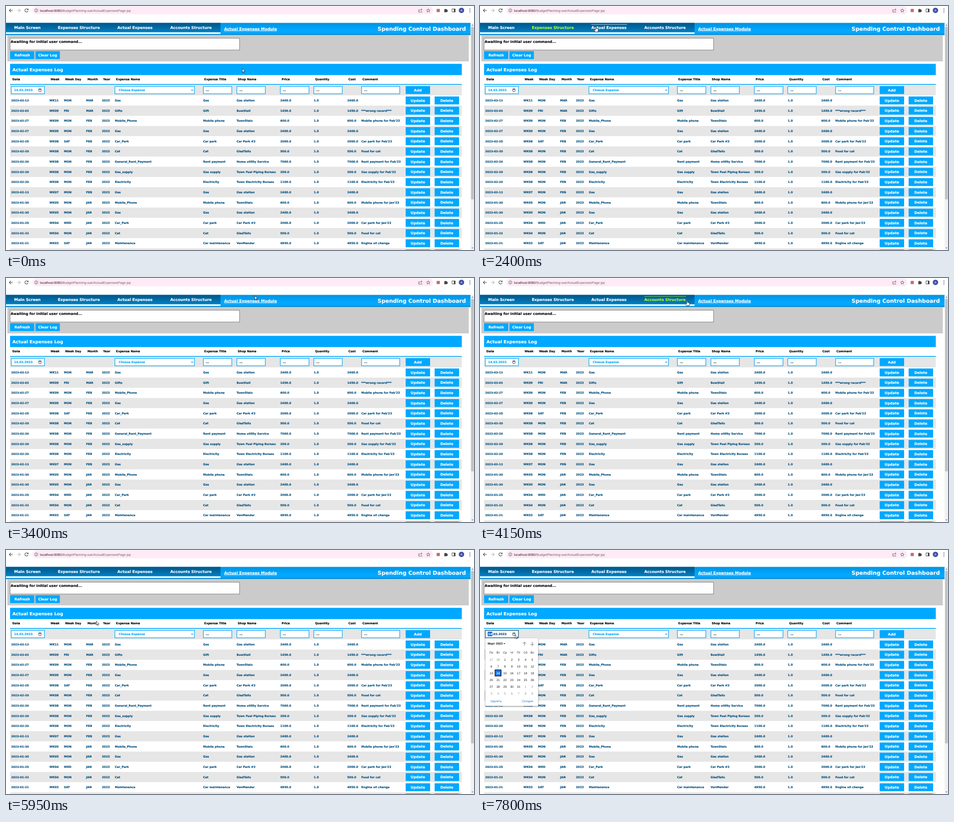
Write an HTML page that moves like this. It is 1034x542 px and loops after 8000 ms.

```html
<!DOCTYPE html>
<html lang="en">
<head>
<meta charset="utf-8">
<title>Actual Expenses</title>
<style>
  html, body { margin: 0; width: 100%; height: 100%; overflow: hidden; background: #fff; }
  svg { display: block; }
  text { fill: currentColor; text-rendering: geometricPrecision; white-space: pre; }
  .heavy { font-family: "DejaVu Sans", sans-serif; font-weight: bold; stroke: currentColor; stroke-width: .18px; }
  .plain { font-family: "Liberation Sans", Arial, sans-serif; }
  .bold { font-weight: bold; }
  .mid { text-anchor: middle; }
  .end { text-anchor: end; }
  .icon { fill: none; stroke: #444; stroke-width: 1.1; }
</style>
</head>
<body>
<svg id="stage" width="1034" height="542" viewBox="0 0 1034 542"></svg>
<script>
const BLUE = '#00a8ff', NAVY = '#004f7f';
const LOOP = 8000, STEP = 50;

const rect = (x, y, w, h, fill, more = '') =>
  `<rect x="${x}" y="${y}" width="${w}" height="${h}" fill="${fill}" ${more}/>`;
const text = (x, y, size, color, str, cls = 'heavy', more = '') =>
  `<text x="${x}" y="${y}" font-size="${size}" class="${cls}" style="color:${color}" ${more}>${str}</text>`;
const icon = (d, more = '') => `<path class="icon" d="${d}" ${more}/>`;
const button = (x, y, w, label) =>
  rect(x, y, w, 17.6, BLUE) + text(x + w / 2, y + 11.8, 7.85, '#fff', label, 'heavy mid');
const field = (x, w, more = '') =>
  rect(x + .6, 178.6, w - 1.2, 16.4, '#fff', `stroke="${BLUE}" stroke-width="1.3" ${more}`);

function browserBar() {
  const dots = [6.5, 10, 13.5].map(y => `<circle cx="1025" cy="${y}" r=".9" fill="#444"/>`).join('');
  return rect(58, 1, 886, 17.5, '#ffeaf7', 'rx="8.7"')
    + icon('M15 10H7.5M11 6.3L7.3 10L11 13.7')
    + icon('M24 10H31.500M28 6.3L31.700 10L28 13.700', 'style="stroke:#b5b5b5"')
    + icon('M48.300 7.800A3.600 3.600 0 1 0 48.800 11M49 5.800V8.500H46.300')
    + '<circle cx="67" cy="9.800" r="3.500" class="icon" style="stroke-width:.8"/>' + icon('M67 9.300V11.800M67 7.600V8.400', 'style="stroke-width:.9"')
    + text(75, 12.6, 7.43, '#222', 'localhost:8080<tspan fill="#666">/BudgetPlanning-war/ActualExpensesPage.jsp</tspan>', 'plain')
    + icon('M913.500 8H911.800V13.500H918.500V11.500M914 11C914 8.500 916 7.800 919 7.800M917 5.600L919.300 7.800L917 10', 'style="stroke-width:.8"')
    + icon('M933 6L934.200 8.600L937 8.900L934.900 10.700L935.500 13.500L933 12L930.500 13.500L931.100 10.700L929 8.900L931.800 8.600Z', 'style="stroke-width:.8"')
    + rect(951.5, 6.5, 7, 7, '#d0646a')
    + '<path d="M968 7.500H970A1.300 1.300 0 1 1 972.600 7.500H974.800V9.500A1.300 1.300 0 1 1 974.800 12V13.800H968V12A1.300 1.300 0 0 0 968 9.500Z" fill="#444"/>'
    + rect(985.5, 6.5, 7, 6.8, 'none', 'stroke="#444"') + rect(989.5, 6.5, 3, 6.8, '#444')
    + '<circle cx="1006.300" cy="9.800" r="6" fill="#3f51a8"/>' + text(1006.3, 12.2, 6.6, '#fff', 'A', 'plain mid')
    + dots;
}

const tabs = [['Main Screen', 18, 76], ['Expenses Structure', 114.5, 208], ['Actual Expenses', 246, 325], ['Accounts Structure', 363, 455]];

function header() {
  const links = tabs.map(([label, x, end], i) =>
    `<g id="tab${i}">${text(x, 51.3, 8.45, 'inherit', label)}`
    + `<path id="line${i}" d="M${x} 40.900H${end}" stroke="currentColor" stroke-width=".9"/></g>`).join('');
  return `<defs>
    <linearGradient id="dark" x2="0" y2="1"><stop stop-color="#005688"/><stop offset="1" stop-color="#0080c6"/></linearGradient>
    <linearGradient id="light" x2="0" y2="1"><stop stop-color="#0093e2"/><stop offset=".6" stop-color="${BLUE}"/></linearGradient>
    </defs>`
    + rect(0, 37.5, 1026.5, 27, 'url(#light)') + rect(0, 62, 1026.5, 2.5, '#0089d2')
    + rect(0, 37.5, 474, 21, 'url(#dark)') + rect(0, 58.5, 474, 3.5, '#fff') + links
    + text(482, 53.8, 8.5, '#fff', 'Actual Expenses Module', 'heavy', 'text-decoration="underline"')
    + text(1016, 55.3, 12, '#fff', 'Spending Control Dashboard', 'heavy end');
}

function controls() {
  return rect(3, 64.5, 1019.5, 58.5, '#cbcbcb')
    + rect(9, 71.5, 507, 26.3, '#fff', 'id="log" stroke-width="1"')
    + text(10.3, 82.2, 7.8, '#000', 'Awaiting for initial user command...')
    + button(9, 100.3, 53.5, 'Refresh') + button(65, 100.3, 54, 'Clear Log');
}

const records = `03-13|WK11|MON|Gas|Gas|Gas station|2400.0|
03-03|WK09|FRI|Gifts|Gift|BowStall|1450.0|***wrong record***
02-27|WK09|MON|Mobile_Phone|Mobile phone|TownDials|600.0|Mobile phone for Feb'23
02-27|WK09|MON|Gas|Gas|Gas station|2400.0|
02-25|WK08|SAT|Car_Park|Car park|Car Park #3|2000.0|Car park for Feb'23
02-20|WK08|MON|Cat|Cat|GladTails|500.0|Food for cat
02-20|WK08|MON|General_Rent_Payment|Rent payment|Home utility Service|7000.0|Rent payment for Feb'23
02-20|WK08|MON|Gas_supply|Gas supply|Town Fuel Piping Bureau|200.0|Gas supply for Feb'23
02-20|WK08|MON|Electricity|Electricity|Town Electricity Bureau|1100.0|Electricity for Feb'23
02-13|WK07|MON|Gas|Gas|Gas station|2400.0|
01-30|WK05|MON|Mobile_Phone|Mobile phone|TownDials|600.0|Mobile phone for Jan'23
01-30|WK05|MON|Gas|Gas|Gas station|2400.0|
01-25|WK04|WED|Car_Park|Car park|Car Park #3|2000.0|Car park for Jan'23
01-23|WK04|MON|Cat|Cat|GladTails|500.0|Food for cat
01-21|WK03|SAT|Maintenance|Car maintenance|VanMender|4950.0|Engine oil change`.split('\n');

const columns = [['Date', 14, 11.5], ['Week', 98.5, 96], ['Week Day', 130.5, 128], ['Month', 180, 177], ['Year', 214.5, 212],
  ['Expense Name', 243, 240.5], ['Expense Title', 438, 435.5], ['Shop Name', 512, 509.5], ['Price', 609, 606],
  ['Quantity', 683, 680], ['Cost', 756.5, 754], ['Comment', 787.5, 785]];

function record(line, i) {
  const [day, week, weekday, name, title, shop, price, note] = line.split('|');
  const month = ['JAN', 'FEB', 'MAR'][day.slice(0, 2) - 1];
  const cells = ['2023-' + day, week, weekday, month, '2023', name, title, shop, price, '1.0', price, note];
  const y = 209.8 + i * 22.66;
  return (i % 2 ? rect(9, y - 11.3, 998, 22.66, '#e6e6e6') : '')
    + cells.map((cell, c) => text(columns[c][2], y + 2.3, c ? 6.25 : 6.1, NAVY, cell)).join('')
    + button(883, y - 8.8, 54, 'Update') + button(947, y - 8.8, 54, 'Delete');
}

function table() {
  const inputs = [[435.5, 64], [509.5, 64], [605.5, 64.5], [679.5, 64], [785, 85.5]]
    .map(([x, w]) => field(x, w) + text(x + 6, 188.6, 6.3, '#222', '...')).join('');
  return rect(9, 128.5, 998, 25, BLUE) + text(14.3, 144.7, 9.64, '#fff', 'Actual Expenses Log')
    + columns.map(([label, x]) => text(x, 165.4, 6.42, '#000', label)).join('')
    + rect(9, 175, 998, 23.5, '#e6e6e6') + rect(9, 173.3, 998, 1.7, BLUE)
    + field(11, 74.5, 'id="date"') + rect(17, 181.5, 10.3, 10, '#0a64c8', 'id="pick"')
    + text(18, 188.9, 6.45, 'inherit', '<tspan id="day">14</tspan>.03.2023', 'heavy', 'id="dateText"')
    + rect(72.6, 184.6, 4.8, 4.8, 'none', 'stroke="#222" stroke-width=".8"') + rect(72.2, 183.8, 5.6, 1.7, '#222')
    + field(240, 177) + text(249, 188.9, 6.35, BLUE, 'Choose Expense')
    + icon('M409.300 185.800L411.300 187.800L413.300 185.800', `style="stroke:#0077b8"`)
    + inputs + button(883, 178, 54, 'Add')
    + records.map(record).join('')
    + rect(9, 538.4, 998, 4, '#e6e6e6') + rect(883, 540.8, 54, 2, BLUE) + rect(947, 540.8, 54, 2, BLUE);
}

function scrollbar() {
  return rect(1026.5, 37.5, 7.5, 504.5, '#f1f1f1') + rect(1027.5, 46.5, 5.8, 383, '#c1c1c1')
    + '<path d="M1028.500 43.500L1030.500 41L1032.500 43.500ZM1028.500 536.500L1030.500 539L1032.500 536.500Z" fill="#777"/>';
}

function calendar() {
  let out = rect(12, 196, 116.5, 150.5, '#fff', 'style="filter:drop-shadow(0 1px 1.5px #0008)"')
    + text(17, 210.3, 6.6, '#111', 'Март 2023', 'plain bold')
    + '<path d="M51.700 207H56L53.850 209.300Z" fill="#222"/>'
    + icon('M98.300 212.500V204.500M94.500 208.200L98.300 204.400L102.100 208.200', 'style="stroke-width:.8"')
    + icon('M115.400 204V212M111.600 208.300L115.400 212.100L119.200 208.300', 'style="stroke-width:.8"')
    + rect(33.2, 266.3, 13.4, 13.6, '#1a78e8', 'stroke="#111" stroke-width="1.4"');
  'Пн Вт Ср Чт Пт Сб Вс'.split(' ').forEach((d, i) => out += text(25 + i * 15.1, 229.8, 6.5, '#222', d, 'plain mid'));
  for (let i = 0; i < 42; i++) {
    const n = i - 1, inside = n > 0 && n < 32;
    const label = n < 1 ? n + 28 : inside ? n : n - 31;
    out += text(25 + i % 7 * 15.1, 245.6 + Math.floor(i / 7) * 15.12, 6.6,
      n === 14 ? '#fff' : inside ? '#111' : '#888', label, n === 14 ? 'plain mid bold' : 'plain mid');
  }
  return `<g id="calendar">${out}${text(23, 338, 6.6, '#2372d6', 'Удалить', 'plain')}${text(92.3, 338, 6.6, '#2372d6', 'Сегодня', 'plain')}</g>`;
}

const pointers = `<g id="pointer" fill="#fff" stroke="#111" stroke-width=".8" stroke-linejoin="round">
  <path id="arrow" d="M0 0V8.500L2 6.800L3.300 9.700L4.600 9.100L3.400 6.300H6Z"/>
  <path id="hand" d="M-.6 1A1 1 0 0 1 1.400 1V4.300L5 5Q6.300 5.300 6 7L5.200 9.500V11.700H-.4L-3.400 7.700Q-3.600 6.200 -2.200 6.500L-.6 8Z"/></g>`;

const stage = document.getElementById('stage');
stage.innerHTML = browserBar() + header() + controls() + table() + scrollbar() + calendar() + pointers;
const $ = id => document.getElementById(id);

// time, x, y of the pointer tip
const path = [[0, 522, 139], [50, 522, 139], [100, 518, 138], [750, 518, 138], [1000, 473, 136.500], [1100, 473, 136.500],
  [1350, 440, 123.500], [1600, 330, 92], [1750, 240, 74], [1950, 170, 71], [2150, 170, 50], [2300, 205, 46], [2400, 255.500, 46],
  [2600, 350, 48], [2700, 420, 50], [2750, 445, 58], [2850, 466.500, 71.500], [3050, 540, 46], [3200, 588, 38], [3450, 540, 40],
  [3650, 466, 46], [4150, 457, 50], [4250, 510, 56], [4380, 610, 63], [4500, 564, 69], [4700, 552, 88], [4850, 528, 108],
  [5150, 450, 140], [5350, 426, 130], [5600, 330, 140], [5950, 199.500, 158], [6200, 267, 163], [6500, 205, 192],
  [6750, 120, 194], [7000, 77.500, 188], [LOOP, 77.500, 188]];

function pointerAt(t) {
  const i = Math.max(1, path.findIndex(p => p[0] >= t));
  const [a, b] = [path[i - 1], path[i]];
  const k = Math.max(0, (t - a[0]) / (b[0] - a[0]));
  return [a[1] + (b[1] - a[1]) * k, a[2] + (b[2] - a[2]) * k];
}

const inside = ([x, y], [x0, y0, x1, y1]) => x >= x0 && x <= x1 && y >= y0 && y <= y1;

// Highlight that lingers and fades after the pointer leaves
function glow(t, box) {
  for (let age = STEP; age < 400 && age <= t; age += STEP)
    if (inside(pointerAt(t - age), box)) return Math.min(1, 1 - (age - 150) / 250);
  return 0;
}

const mix = (a, b, k) => `rgb(${a.map((v, i) => Math.round(v + (b[i] - v) * k))})`;

function draw() {
  const t = Math.floor(performance.now() % LOOP / STEP) * STEP;
  const tip = pointerAt(t);
  let onTab = false;
  tabs.forEach(([, x, end], i) => {
    const box = [x - 3, 40, end + 4, 58], over = inside(tip, box);
    onTab ||= over;
    $('tab' + i).style.color = mix([255, 255, 255], [173, 255, 47], glow(t, box));
    $('line' + i).style.opacity = over ? .85 : 0;
  });
  $('log').setAttribute('stroke', mix([118, 118, 118], [0, 79, 127], glow(t, [9, 73, 516, 98])));
  const date = mix([0, 168, 255], [0, 79, 127], glow(t, [11, 178, 85, 196]));
  $('date').setAttribute('stroke', date);
  $('dateText').style.color = date;
  const picked = t >= 7000;
  $('pick').style.opacity = +picked;
  $('day').style.fill = $('day').style.stroke = picked ? '#fff' : '';
  $('calendar').style.opacity = Math.min(1, Math.max(0, (t - 7650) / 150));
  $('pointer').setAttribute('transform', `translate(${tip})`);
  $('arrow').style.display = onTab ? 'none' : '';
  $('hand').style.display = onTab ? '' : 'none';
  requestAnimationFrame(draw);
}
draw();
</script>
</body>
</html>
```
